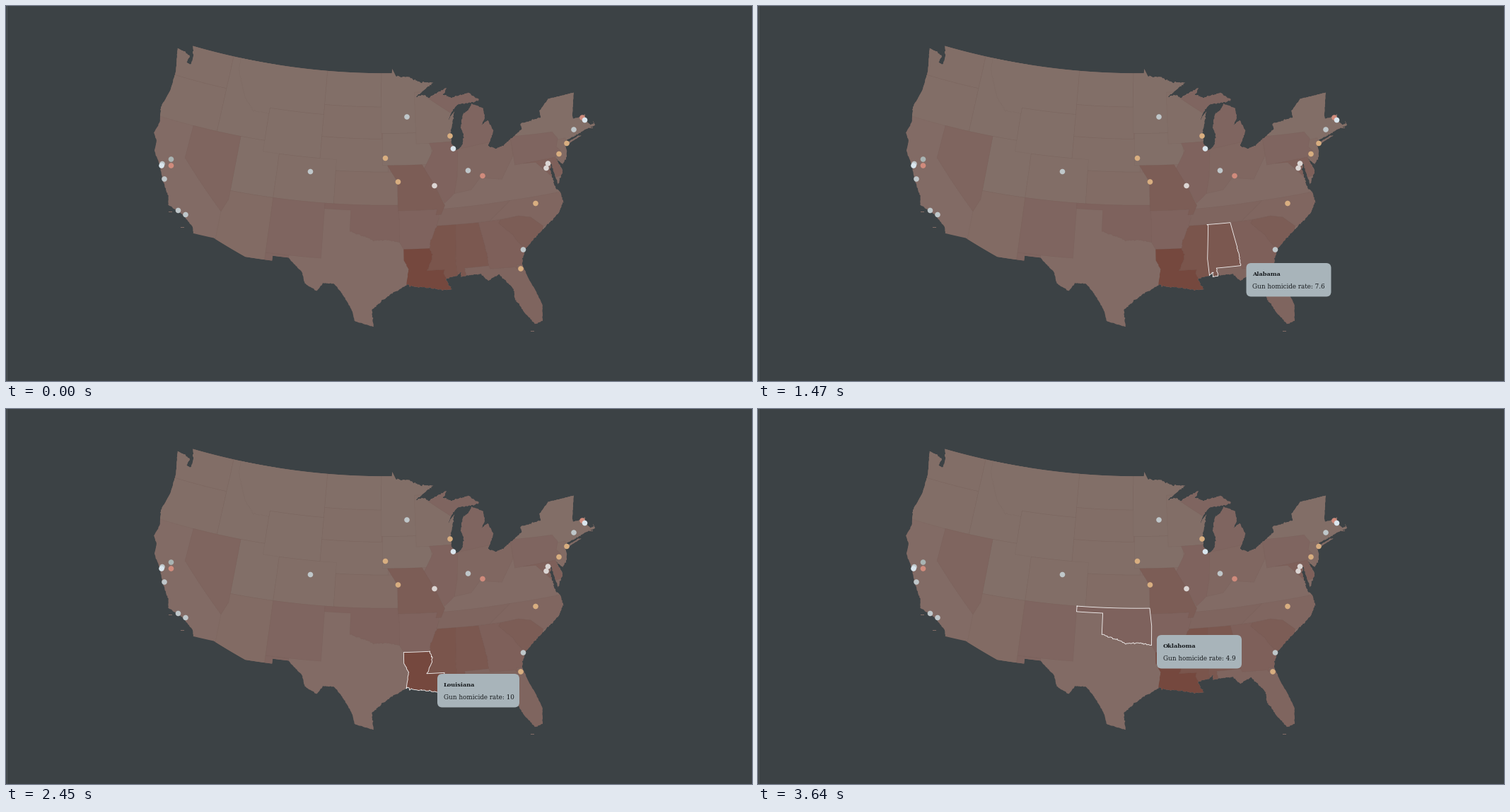
A matplotlib script for the animation above (3710 ms loop, 1055 by 531 pixels).

```python
import numpy as np
import matplotlib.pyplot as plt
from matplotlib.animation import FuncAnimation
from matplotlib.patches import Circle, FancyBboxPatch, Polygon

W, H, DPI = 1055, 531, 72
FRAMES, INTERVAL = 53, 70
rng = np.random.default_rng(4)

fig = plt.figure(figsize=(W / DPI, H / DPI), dpi=DPI, facecolor="#3c4245")
ax = fig.add_axes([0, 0, 1, 1])
ax.set(xlim=(0, W), ylim=(H, 0))
ax.axis("off")
ax.plot([0.5, 0.5], [0, H], color="#50565a", lw=1)


# Geometry: points are (degrees west, degrees north).
def pts(*values):
    return np.array(values, float).reshape(-1, 2)


def densify(points, step):
    out = []
    for a, b in zip(points[:-1], points[1:]):
        n = max(1, int(np.ceil(np.hypot(*(b - a)) / step)))
        out.append(a + (b - a) * np.arange(n)[:, None] / n)
    return np.vstack(out + [points[-1:]])


def rough(*values, amp=0.035):
    """Ragged line through a few key points, for coasts and rivers."""
    line = densify(pts(*values), 0.13)
    line[1:-1] += rng.normal(0, amp, line[1:-1].shape)
    return line


def box(west, east, south, north):
    return pts(west, north, east, north, east, south, west, south, west, north)


def join(*lines):
    return np.vstack(lines)


def project(points):
    """Albers equal-area conic projection to stage pixels."""
    west, north = np.radians(densify(points, 0.8)).T
    s1, s2 = np.sin(np.radians([29.5, 45.5]))
    n = (s1 + s2) / 2
    c = 1 - s1 ** 2 + 2 * n * s1
    rho = np.sqrt(c - 2 * n * np.sin(north)) / n
    theta = n * (np.radians(96) - west)
    return np.column_stack([537 + 889.6 * rho * np.sin(theta),
                            -885 + 889.6 * rho * np.cos(theta)])


# Coasts, clockwise from the north-west.
PUGET = rough(124.7, 48.4, 122.8, 48.1, 123, 47.4, 122.4, 47.3, 122.3, 48, 122.8, 49)
BOUNDARY = pts(122.8, 49, 95.15, 49, 95.1, 49.4, 94.6, 48.7)
SUPERIOR = rough(94.6, 48.7, 92.9, 48.6, 91.4, 48.1, 89.6, 48, 92.1, 46.75, 90.8, 46.9,
                 90.4, 46.6, 87.8, 47.45, 88.4, 46.8, 87.4, 46.5, 85, 46.75, 84.1, 46.2,
                 83.7, 46, 84.75, 45.9)
MICHIGAN = rough(84.75, 45.9, 86.7, 45.8, 87.6, 45.1, 88, 44.5, 87.1, 45.2, 87.9, 43.2,
                 87.8, 42.3, 87.3, 41.65, 86.5, 42.1, 86.2, 43, 86.5, 43.7, 86.1, 44.8,
                 85.3, 45.2, 84.75, 45.75)
LOWER_LAKES = rough(84.75, 45.75, 83.4, 45.2, 83.3, 44.3, 83.9, 43.7, 82.95, 44.05,
                    82.45, 43, 83.4, 41.75, 82.5, 41.4, 81.5, 41.6, 78.9, 42.8,
                    79, 43.27, 76.3, 43.5, 76.3, 44.1, 74.9, 45, amp=0.025)
NORTHEAST = rough(74.9, 45, 71.5, 45, 72.4, 43, 72.4, 42.73, 71.3, 42.7, 70.8, 42.85,
                  amp=0.01)
NEW_ENGLAND = rough(70.8, 42.85, 71, 42.3, 70.5, 41.8, 70.05, 41.8, 70.1, 42.05,
                    69.95, 41.65, 71.2, 41.5, 73.7, 41, 74.05, 40.65, amp=0.02)
MID_ATLANTIC = rough(74.05, 40.65, 74.1, 39.7, 74.9, 38.95, 75.55, 39.6, 75.05, 38.4,
                     75.95, 37.2, 76.2, 39.2, 76.5, 38.7, 76.3, 37, 75.9, 36.55)
CAROLINAS = rough(75.9, 36.55, 75.8, 35.6, 76.5, 34.75, 77.9, 33.95, 79.2, 33.2, 80.87, 32.03)
GA_COAST = rough(80.87, 32.03, 81.3, 31.2, 81.45, 30.71)
FL_COAST = join(rough(81.45, 30.71, 80.95, 29.15, 80.55, 28.3, 80.05, 26.8, 80.3, 25.3,
                      amp=0.015),
                rough(80.3, 25.3, 81.1, 25.15, 81.8, 26.1, 82.7, 27.6, 82.7, 28.6,
                      84, 30.1, 85.2, 29.65, 86, 30.35, 87.5, 30.28))
AL_COAST = rough(87.5, 30.28, 88, 30.25, 88, 30.65, 88.4, 30.37)
MS_COAST = rough(88.4, 30.37, 89.6, 30.2)
LA_COAST = rough(89.6, 30.2, 89.4, 29.6, 89, 29.1, 90.1, 29.15, 91.3, 29.4, 93.85, 29.7,
                 amp=0.05)
GULF = rough(93.85, 29.7, 95, 29.2, 96.4, 28.35, 97.4, 27.5, 97.2, 25.95)
RIO_GRANDE = rough(97.2, 25.95, 99.1, 26.4, 99.5, 27.5, 100.6, 29, 101.4, 29.75,
                   102.6, 29.75, 103.2, 29, 104.5, 29.6, 104.9, 30.6, 106.5, 31.78,
                   amp=0.02)
SOUTHWEST = pts(106.5, 31.78, 108.2, 31.78, 108.2, 31.33, 111.1, 31.33, 114.8, 32.5,
                117.1, 32.53)
PACIFIC = rough(117.1, 32.53, 117.3, 33.1, 118.4, 33.8, 119.2, 34.15, 120.5, 34.5,
                120.7, 35.2, 121.9, 36.6, 122.5, 37.6, 123.7, 38.9, 123.8, 39.8,
                124.4, 40.4, 124.1, 41.5, 124.5, 42.8, 124, 44.5, 124, 46.3, 124.7, 48.4,
                amp=0.02)
LONG_ISLAND = rough(73.9, 40.75, 72.3, 41.1, 71.9, 41.07, 73.8, 40.57, amp=0.02)
KEYS = rough(80.3, 25.3, 80.5, 24.95, 82.1, 24.58, amp=0.04)

# Inner borders shared by several states
PERDIDO = rough(87.5, 30.28, 87.6, 31, amp=0.04)
FL_AL = pts(87.6, 31, 85, 31)
FL_GA = pts(85, 31, 84.86, 30.7, 82.2, 30.57, 82.05, 30.36, 82, 30.75, 81.45, 30.71)
CHATTAHOOCHEE = join(pts(85.6, 34.98), rough(85.18, 32.87, 85.05, 32, 85, 31, amp=0.03))
SAVANNAH = rough(83.1, 35, 83.35, 34.7, 82, 33.5, 81.4, 32.6, 80.87, 32.03, amp=0.02)
TOMBIGBEE = pts(88.2, 35, 88.1, 34.9, 88.47, 31.9, 88.4, 30.37)
PEARL = rough(89.6, 30.2, 89.85, 30.65, 89.73, 31, amp=0.02)
LOWER_RIVER = rough(91.63, 31, 90.95, 32.1, 91.17, 33)
UPPER_RIVER = rough(91.17, 33, 91.1, 33.6, 90.25, 35)
SABINE = rough(93.85, 29.7, 93.55, 31.2, 94.04, 32, amp=0.02)
RED_RIVER = rough(94.48, 33.64, 95.9, 33.87, 97.2, 33.8, 98.3, 34.15, 100, 34.56)

STOPS = [1, 3, 4.5, 6.5, 8.5, 10]
PALETTE = np.array([(130, 112, 105), (130, 108, 101), (127, 100, 95),
                    (124, 92, 85), (122, 85, 76), (117, 72, 62)]) / 255


def shade(rate):
    return [np.interp(rate, STOPS, channel) for channel in PALETTE.T]


BASE = shade(3.1)
land = Polygon(project(join(
    PUGET, BOUNDARY, SUPERIOR, MICHIGAN, LOWER_LAKES, NORTHEAST, NEW_ENGLAND,
    MID_ATLANTIC, CAROLINAS, GA_COAST, FL_COAST, AL_COAST, MS_COAST, LA_COAST,
    GULF, RIO_GRANDE, SOUTHWEST, PACIFIC)), fc=BASE, lw=0)
ax.add_patch(land)
ax.add_patch(Polygon(project(LONG_ISLAND), fc=BASE, lw=0))
for x, y in [(230, 291), (247, 313), (742, 459.5), (825, 172)]:
    ax.plot([x, x + 4], [y, y], color=BASE, lw=1)


def state(rate, outline):
    patch = Polygon(project(outline), fc=shade(rate), ec=(0.25, 0.15, 0.12, 0.05), lw=0.6)
    ax.add_patch(patch)
    patch.set_clip_path(land)


# Neighbours overlap: each state trims the ones drawn before it.
for rate, *edges in [
    (2.2, 126, 117, 42, 46),         # Oregon
    (1.8, 126, 117, 46, 50),         # Washington
    (1.4, 117, 111, 42, 50),         # Idaho
    (1.5, 114, 109, 37, 42),         # Utah
    (1.6, 111, 104, 41, 45),         # Wyoming
    (2.1, 104, 95.7, 40, 43),        # Nebraska
    (2.0, 109, 102, 37, 41),         # Colorado
    (2.9, 102, 94.6, 37, 40),        # Kansas
    (1.5, 104, 96.6, 45.9, 50),      # North Dakota
    (1.8, 104, 96.5, 43, 45.9),      # South Dakota
    (1.5, 96.6, 88, 43.5, 50),       # Minnesota
    (1.5, 96.4, 90.4, 40.6, 43.5),   # Iowa
    (2.2, 92.2, 86.8, 42.5, 47.2),   # Wisconsin
    (2.0, 80, 69, 40.5, 45.2),       # New York and New England
    (3.2, 75.5, 73.9, 38.8, 41.2),   # New Jersey
    (3.2, 114.6, 109, 31, 37),       # Arizona
    (4.3, 109, 106.5, 31, 32),       # New Mexico, south-west corner
    (4.3, 109, 103, 32, 37),         # New Mexico
]:
    state(rate, box(*edges))

MONTANA = rough(116, 49.1, 116, 48, 114.4, 45.5, 113, 44.5, 111, 44.5)
state(1.6, join(MONTANA, pts(111, 45, 104, 45, 104, 49.1)))
state(4.4, pts(120, 42, 114, 42, 114, 36.2, 114.6, 35, 120, 39))            # Nevada
state(4.3, pts(90.4, 46.6, 87.6, 45.1, 86.8, 45, 87.2, 41.75, 82, 41.7,     # Michigan
               82, 46.5, 87.5, 48, 90.4, 47))
state(4.0, pts(87.5, 41.75, 80.5, 42.3, 80.5, 40.6, 82.3, 38.6,             # Indiana, Ohio
               84.8, 39, 86, 38, 88, 37.8))
state(4.8, pts(90.6, 42.5, 87, 42.5, 87.5, 39.3, 88, 37.8, 89.2, 37,        # Illinois
               90.2, 38.6, 91.4, 40.2, 90.2, 41.8))
state(4.7, join(pts(94.6, 36.5, 89.7, 36.5), UPPER_RIVER[::-1],             # Arkansas
                pts(94.04, 33, 94.48, 33.64)))
state(4.4, pts(89.5, 36.5, 81.7, 36.6, 84.3, 35, 90.3, 35))                 # Tennessee
state(6.3, pts(95.8, 40.6, 91.6, 40.6, 90.2, 38.6, 89.2, 36.8, 89.7, 36,    # Missouri
               90.3, 36, 90.1, 36.5, 94.6, 36.5, 94.6, 39.1))
state(4.2, pts(81.7, 36.6, 75, 36.55, 75, 34, 78.5, 33.8, 79.7, 34.8,       # North Carolina
               81, 35.1, 84.3, 35))
state(6.2, join(pts(81, 35.1, 79.7, 34.8, 78.5, 33.8, 79.5, 32), SAVANNAH[::-1]))
state(4.3, pts(80.5, 42.3, 75.3, 42, 74.8, 41.3, 75.2, 40.6, 74.8, 40.2,    # Pennsylvania
               75.6, 39.7, 80.5, 39.7))
state(5.5, pts(79.5, 39.7, 75.6, 39.7, 75, 38, 76.3, 37.9, 77.2, 38.8, 78, 39.6))

# Highlighted states: rate, first frame, tooltip corner, outline.
HOVERS = {
    "Florida": ("4.4", 1, (745, 380), join(FL_COAST, PERDIDO, FL_AL, FL_GA)),
    "Georgia": ("5.4", 7, (729, 367), join(
        pts(85.6, 34.98), SAVANNAH, GA_COAST, FL_GA[::-1], CHATTAHOOCHEE[::-1])),
    "Alabama": ("7.6", 16, (690.5, 364), join(
        pts(88.2, 35), CHATTAHOOCHEE, FL_AL[::-1], PERDIDO[::-1], AL_COAST,
        TOMBIGBEE[::-1])),
    "Mississippi": ("8.5", 24, (646, 362.5), join(
        TOMBIGBEE, MS_COAST, PEARL, LOWER_RIVER, UPPER_RIVER, TOMBIGBEE[:1])),
    "Louisiana": ("10", 33, (610, 375), join(
        LOWER_RIVER[::-1], PEARL[::-1], LA_COAST, SABINE, pts(94.04, 33),
        LOWER_RIVER[-1:])),
    "Oklahoma": ("4.8", 39, (564, 320), join(
        pts(103, 37, 94.62, 37, 94.43, 35.4), RED_RIVER,
        pts(100, 36.5, 103, 36.5, 103, 37))),
}
HOVERS["Oklahoma"] = ("4.9", *HOVERS["Oklahoma"][1:])
outlines = {}
for name, (rate, _, _, border) in HOVERS.items():
    state(float(rate), border)
    outlines[name] = project(border)
outlines["Florida"] = join(outlines["Florida"], [[np.nan, np.nan]], project(KEYS))

# City dots
DOTS = {
    "#d08b7c": [(233.5, 226), (674, 240.5), (815, 158)],
    "#bfc7ca": [(567, 157), (653.5, 233), (430.5, 234.5), (221, 223.5), (224, 245),
                (243.5, 289.5), (254, 295.5), (731.5, 345), (803, 175)],
    "#a9b4b3": [(233.5, 217)],
    "#d8ae80": [(628, 184), (536.5, 215.5), (554.5, 249), (749, 279.5), (728, 372),
                (782, 209.5), (793, 194.5)],
    "#dcd6d4": [(606, 254.5), (766.5, 223), (764, 229.5)],
    "#dae6ee": [(632.5, 202), (220, 226), (818.5, 161.5)],
}
for color, spots in DOTS.items():
    for spot in spots:
        ax.add_patch(Circle(spot, 3.8, fc=color, lw=0, zorder=4))

# Hover outline and tooltip
outline, = ax.plot([], [], color="white", lw=0.9, alpha=0.9, zorder=3,
                   solid_joinstyle="round")
card = FancyBboxPatch((0, 0), 1, 1, fc="#a8b4ba", lw=0, zorder=5,
                      boxstyle="round,pad=0,rounding_size=7")
ax.add_patch(card)
font = dict(family="DejaVu Serif", color="#15191c", va="baseline", zorder=6)
title = ax.text(0, 0, "", size=8.2, weight="bold", **font)
detail = ax.text(0, 0, "", size=8.75, **font)


def update(frame):
    shown = [name for name, hover in HOVERS.items() if hover[1] <= frame]
    for artist in (outline, card, title, detail):
        artist.set_visible(bool(shown))
    if shown:
        name = shown[-1]
        rate, _, (x, y), _ = HOVERS[name]
        outline.set_data(*outlines[name].T)
        card.set_bounds(x, y, 120 if "." in rate else 116, 47.5)
        title.set_text(name)
        title.set_position((x + 8.7, y + 17.7))
        detail.set_text(f"Gun homicide rate: {rate}")
        detail.set_position((x + 8.7, y + 36.3))
    return outline, card, title, detail


anim = FuncAnimation(fig, update, frames=FRAMES, interval=INTERVAL,
                     repeat=True, repeat_delay=0)
plt.show()
```
